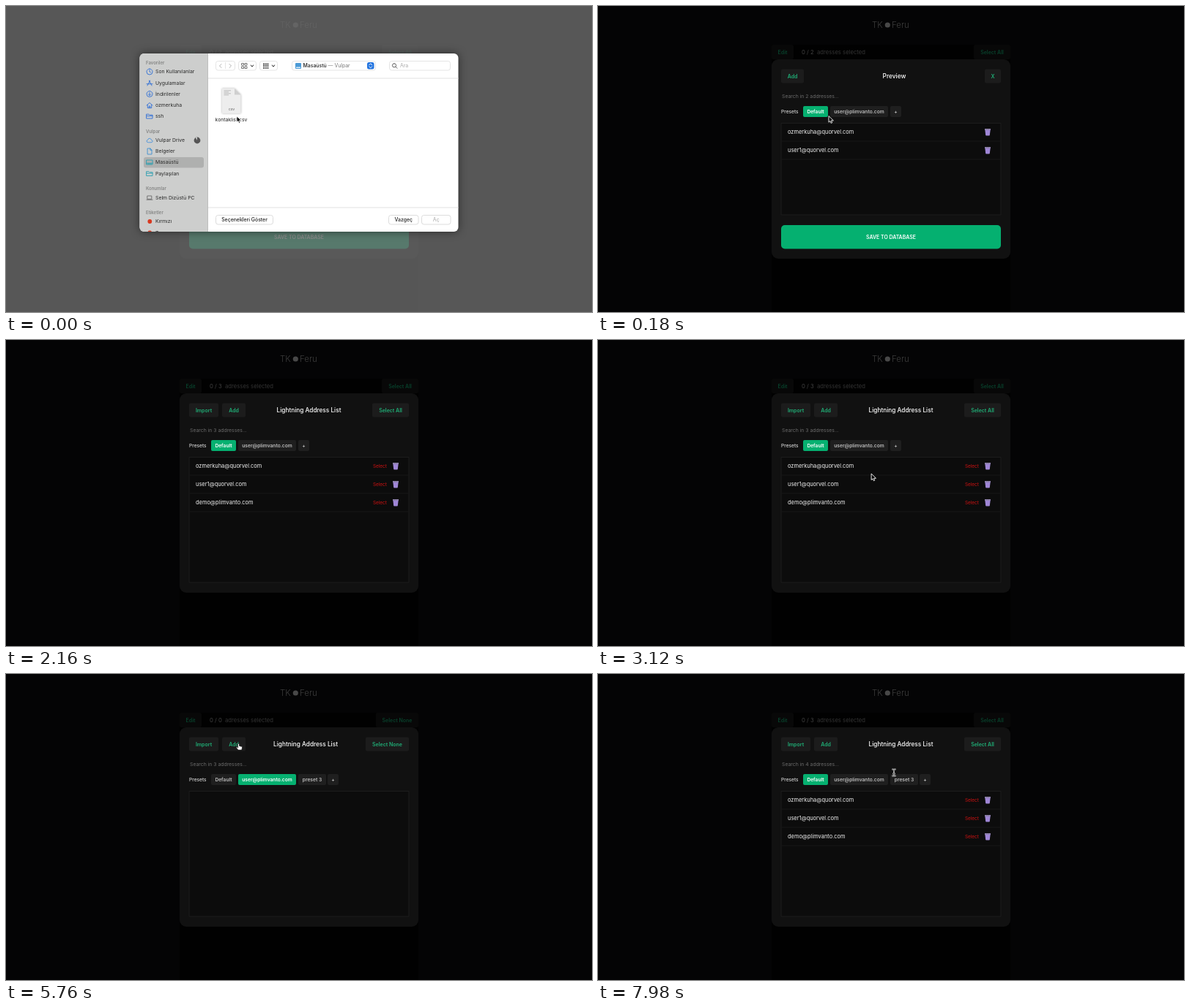
Recreate the animation shown at these times as an HTML page with a canvas. Size 800x419 px, loop 8 s.

```html
<!DOCTYPE html>
<html lang="en">
<head>
<meta charset="utf-8">
<title>Address list</title>
<style>
  html, body { margin: 0; width: 100%; height: 100%; overflow: hidden; background: #040405; }
  canvas { display: block; width: 800px; height: 419px; }
</style>
</head>
<body>
<canvas id="stage"></canvas>
<script>
const LOOP = 8000, STEP = 60;
const FONT = 'Inter, "Open Sans", sans-serif';
const GREEN = '#05b070', BUTTON = '#1c1c1c', LABEL = '#1fae76';
const PRESET = 'user@plimvanto.com', NEW_ADDRESS = 'demo@plimvanto.com';
const SAVED = ['ozmerkuha@quorvel.com', 'user1@quorvel.com', NEW_ADDRESS];

const canvas = document.getElementById('stage');
const ctx = canvas.getContext('2d');
const ratio = window.devicePixelRatio || 1;
canvas.width = 800 * ratio;
canvas.height = 419 * ratio;

// ---------- drawing helpers ----------
function box(x1, y1, x2, y2, fill, radius = 0, stroke) {
  const inset = stroke ? 0.5 : 0;
  ctx.beginPath();
  ctx.roundRect(x1 + inset, y1 + inset, x2 - x1 - 2 * inset, y2 - y1 - 2 * inset, radius);
  if (fill) { ctx.fillStyle = fill; ctx.fill(); }
  if (stroke) { ctx.strokeStyle = stroke; ctx.lineWidth = 1; ctx.stroke(); }
}

// y is the middle of the capital letters
function text(str, x, y, size, color, weight = 400, align = 'left') {
  ctx.font = `${weight} ${size}px ${FONT}`;
  ctx.textAlign = align;
  ctx.fillStyle = color;
  ctx.fillText(str, x, y + size * 0.36);
  return ctx.measureText(str).width;
}

function shape(d, x, y, fill, stroke, width = 0.9) {
  ctx.save();
  ctx.translate(x, y);
  const path = new Path2D(d);
  if (fill) { ctx.fillStyle = fill; ctx.fill(path); }
  if (stroke) {
    ctx.strokeStyle = stroke;
    ctx.lineWidth = width;
    ctx.lineCap = ctx.lineJoin = 'round';
    ctx.stroke(path);
  }
  ctx.restore();
}

function dot(x, y, r, color) {
  ctx.beginPath();
  ctx.arc(x, y, r, 0, 7);
  ctx.fillStyle = color;
  ctx.fill();
}

function button(label, x1, y1, x2, y2, fill = BUTTON, color = LABEL, size = 7, weight = 600) {
  box(x1, y1, x2, y2, fill, 2);
  text(label, (x1 + x2) / 2, (y1 + y2) / 2, size, color, weight, 'center');
}

// ---------- app state by time ----------
const typed = (str, t, start, end) =>
  str.slice(0, Math.max(0, Math.floor((t - start) / (end - start) * str.length + 1e-6)));

function stateAt(t) {
  const preview = t < 780;
  const second = t >= 5280 && t < 7560;
  const added = t >= 6960;
  return {
    preview, second,
    addresses: preview ? SAVED.slice(0, 2) : second ? (added ? [NEW_ADDRESS] : []) : SAVED,
    total: preview ? 2 : added ? 4 : 3,
    presetInput: t >= 3960 && t < 4740,
    presetName: typed('preset 3', t, 4260, 4620),
    thirdPreset: t >= 4740,
    form: t >= 5880 && t < 6960,
    entry: t >= 6780 ? NEW_ADDRESS : typed('demo@plimv', t, 6180, 6560),
    suggest: t >= 6240 && t < 6780
  };
}

// ---------- page and panel ----------
function drawPage(s) {
  const selectLabel = s.addresses.length ? 'Select All' : 'Select None';
  box(0, 0, 800, 419, '#040405');
  box(237, 53, 563, 419, '#010101');
  text('TK', 374, 26, 11.5, '#3d3d3d', 300);
  dot(395.3, 26, 3.6, '#484848');
  text('Feru', 401, 26, 11.5, '#3d3d3d', 300);
  button('Edit', 237, 53, 267, 73, '#080808', '#08402b');
  text(`0 / ${s.addresses.length}`, 278, 63, 7.7, '#434343');
  text('adresses selected', 299, 63, 7.7, '#343434');
  button(selectLabel, s.addresses.length ? 513 : 505, 53, 563, 73, '#080808', '#08402b');
}

function drawTrash(x, y) {
  shape('M-3.6-2.6H3.6L2.8 4.6Q2.6 5 2 5H-2Q-2.6 5-2.8 4.6Z', x, y, '#9f86d6');
  shape('M-4-4.2H4V-2.8H-4Z', x, y, '#c3b0ee');
}

function drawPresets(s, y) {
  const chip = (label, x1, x2, active) => button(label, x1, y - 7.5, x2, y + 7.5,
    active ? GREEN : '#1f1f1f', active ? '#fff' : '#bdbdbd', 6.65);
  text('Presets', 250, y, 6.65, '#f0f0f0');
  chip('Default', 280, 314, !s.second);
  chip(PRESET, 317, 396, s.second);
  if (s.thirdPreset) {
    chip('preset 3', 399, 437);
    chip('+', 439, 454);
    return;
  }
  chip('+', 399, 414);
  if (!s.presetInput) return;
  box(397.5, y - 8.5, 414.5, y + 8.5, null, 3, '#cdd5ff');
  box(398.5, y - 7.5, 413.5, y + 7.5, null, 2, '#4c62c8');
  box(416, y - 7.5, 501, y + 7.5, '#fff', 1);
  if (s.presetName) {
    const width = text(s.presetName, 422, y, 6.8, '#111');
    box(422.5 + width, y - 4, 423.2 + width, y + 4, '#111');
  } else text('Press enter...', 422, y, 6.6, '#858585');
}

function drawForm(s) {
  box(250, 115, 550, 156, '#0c0c0c', 0, '#1d1d1d');
  text('New Address', 259, 136, 7.6, '#f4f4f4', 500);
  const width = text(s.entry, 326, 136, 6.9, '#10b573');
  box(326.5 + width, 132, 327.3 + width, 140, '#10b573');
}

function drawSuggestion() {
  shape('M0 5L5 0L10 5Z', 385, 147, '#fafafa');
  box(379, 151, 483, 175.5, '#fafafa', 2);
  text(NEW_ADDRESS, 385.5, 163.5, 7.1, '#1c1c1c');
}

function drawPanel(s) {
  const y = s.form ? 51 : 0;
  const listBottom = s.preview ? 286.5 : 332.5;
  box(237, 73, 563, 346, '#111', 9);

  if (s.preview) {
    button('Add', 250, 86.5, 281, 105.5);
    button('X', 528, 86.5, 550, 105.5);
    text('Preview', 404.5, 96, 8.4, '#fff', 500, 'center');
  } else {
    const none = !s.addresses.length;
    button('Import', 250, 86.5, 290, 105.5);
    button(s.form ? 'X' : 'Add', 295, 86.5, s.form ? 317.5 : 327, 105.5);
    button(none ? 'Select None' : 'Select All', none ? 491 : 500, 86.5, 550, 105.5);
    text('Lightning Address List', s.form ? 404.5 : none ? 409 : 413.5, 96, 8.25, '#fff', 500, 'center');
  }

  if (s.form) drawForm(s);
  text(`Search in ${s.total} addresses...`, 251, 124 + y, 6.85, '#6b6b6b');
  drawPresets(s, 144.5 + y);

  box(249.5, 160 + y, 550.5, listBottom, '#0c0c0c', 0, '#1d1d1d');
  s.addresses.forEach((address, i) => {
    const rowY = 172.5 + y + i * 25;
    text(address, 259, rowY, 7.45, '#f2f2f2');
    if (!s.preview) text('Select', 501, rowY + 0.5, 6.4, '#d01212');
    drawTrash(532, rowY);
    box(250, rowY + 12, 550, rowY + 13, '#161616');
  });

  if (s.preview) {
    box(250, 300, 550, 332.5, GREEN, 5);
    text('SAVE TO DATABASE', 400, 316, 6.95, '#fff', 600, 'center');
  }
  if (s.suggest) drawSuggestion();
}

// ---------- file dialog ----------
const ICONS = {
  clock: 'M4 0A4 4 0 1 1 4 8A4 4 0 1 1 4 0M4 1.8V4L5.5 5',
  apps: 'M1 7.5L4.6 .6M3.4 .6L7 7.5M0 5.2H8',
  down: 'M4 0A4 4 0 1 1 4 8A4 4 0 1 1 4 0M4 2V6M2.4 4.4L4 6L5.6 4.4',
  home: 'M0 4L4 .5L8 4M1.3 3.5V7.6H6.7V3.5M3.2 7.6V5H4.8V7.6',
  folder: 'M0 1.2H3L4 2.2H8V7H0ZM0 3.6H8',
  cloud: 'M2 6.8Q0 6.8 0 5Q0 3.5 1.6 3.4Q2 1 4.4 1.3Q6.2 1.6 6.4 3.6Q8.2 3.8 8.2 5.2Q8 6.8 6.4 6.8Z',
  page: 'M1.5 0H5L7 2V8H1.5ZM4.8 0V2.3H7',
  desktop: 'M0 1H8V7H0ZM0 5.2H8M1.6 6.1H6.4',
  laptop: 'M1.2 1.5H6.8V5.8H1.2ZM0 6.8H8'
};
const BLUE = '#2f6fd6', TEAL = '#2d9fb0', GREY = '#6b6b6b';
const SIDEBAR = [
  ['Favoriler', 78],
  ['Son Kullanılanlar', 90, 'clock', BLUE], ['Uygulamalar', 105.5, 'apps', BLUE],
  ['İndirilenler', 120.5, 'down', BLUE], ['ozmerkuha', 136, 'home', BLUE], ['ssh', 151, 'folder', BLUE],
  ['Vulpar', 171.5],
  ['Vulpar Drive', 184, 'cloud', '#4a94dc'], ['Belgeler', 199, 'page', '#3f8fd0'],
  ['Masaüstü', 214, 'desktop', TEAL], ['Paylaşılan', 229.5, 'folder', TEAL],
  ['Konumlar', 250],
  ['Selm Dizüstü PC', 262.5, 'laptop', GREY],
  ['Etiketler', 282.5],
  ['Kırmızı', 295, null, '#d8391f'], ['Turuncu', 310.5, null, '#d8391f']
];

function drawSidebar() {
  box(182, 65, 276, 309, '#cdcecd');
  box(275, 65, 276, 309, '#bdbebd');
  box(188, 207, 270, 221.5, '#afb0af', 3);
  for (const [label, y, icon, color] of SIDEBAR) {
    if (!color) { text(label, 191, y, 6, '#858685', 600); continue; }
    if (icon) shape(ICONS[icon], 192, y - 4, null, color);
    else dot(196.3, y, 2.9, color);
    text(label, 204, y, 6.85, '#2a2a2a');
  }
  dot(261, 184, 4.4, '#555');
  shape('M0 0V-4.4A4.4 4.4 0 0 0-2.2-3.8Z', 261, 184, '#cdcecd');
}

function drawToolbar() {
  const frame = (x1, x2) => box(x1, 75, x2, 88.5, '#fff', 3, '#e4e4e4');
  frame(286, 313); frame(317, 342); frame(346, 371); frame(390, 505); frame(523, 607);
  box(299, 77, 300, 86, '#e4e4e4');
  shape('M2-2.5L-.5 0L2 2.5', 292, 82, null, '#a8a8a8');
  shape('M-2-2.5L.5 0L-2 2.5', 307, 82, null, '#a8a8a8');
  shape('M0 0H2.6V2.6H0ZM4.4 0H7V2.6H4.4ZM0 4.4H2.6V7H0ZM4.4 4.4H7V7H4.4Z', 322, 78.5, null, '#555', 0.8);
  for (let i = 0; i < 9; i++) {
    const x = 351 + i % 3 * 2.7, y = 78.5 + Math.floor(i / 3) * 2.7;
    box(x, y, x + 2.1, y + 1.9, '#555');
  }
  for (const x of [336, 365]) shape('M-1.8-1L0 1L1.8-1', x, 82, null, '#444', 1.1);
  box(395, 78, 403, 86, '#4b9ad6', 1);
  box(396, 83.5, 402, 85, '#dcecf8');
  const width = text('Masaüstü', 405.5, 82, 6.9, '#222', 500);
  text(' — Vulpar', 405.5 + width, 82, 6.9, '#777');
  box(493, 77, 502.5, 86.5, '#2475e0', 2.5);
  shape('M-2-1L0-3L2-1M-2 1L0 3L2 1', 497.7, 81.8, null, '#fff', 1);
  shape('M0-2.6A2.6 2.6 0 1 1 0 2.6A2.6 2.6 0 1 1 0-2.6M2 2L4 4', 530, 81.3, null, '#555');
  text('Ara', 538, 82, 6.9, '#a9a9a9');
}

function drawFile() {
  ctx.save();
  ctx.shadowColor = '#0005';
  ctx.shadowBlur = 3 * ratio;
  shape('M0 0H17L25.5 8.5V34H0Z', 295, 113, '#ededed');
  ctx.restore();
  shape('M17 0V8.5H25.5Z', 295, 113, '#cfcfcf');
  for (let i = 0; i < 4; i++) box(297.5, 115.5 + i * 2, 307 - i % 2 * 3, 116.3 + i * 2, '#aaa');
  text('CSV', 308, 141.5, 4, '#777', 600, 'center');
  text('kontaklist.csv', 307.5, 155.5, 6.8, '#222', 400, 'center');
}

function drawDialog(alpha) {
  ctx.globalAlpha = alpha;
  box(0, 0, 800, 419, 'rgba(108,108,108,.8)');
  ctx.save();
  ctx.shadowColor = '#0008';
  ctx.shadowBlur = 12 * ratio;
  box(182.5, 65, 617.5, 309, '#fff', 6);
  ctx.restore();
  ctx.save();
  ctx.beginPath();
  ctx.roundRect(182.5, 65, 435, 244, 6);
  ctx.clip();
  drawSidebar();
  drawToolbar();
  box(276, 98.5, 618, 99.5, '#e2e2e2');
  box(276, 275.5, 618, 276.5, '#e2e2e2');
  drawFile();
  const plain = (label, x1, x2, color) => {
    box(x1, 286, x2, 299.5, '#fff', 3, '#dcdcdc');
    text(label, (x1 + x2) / 2, 292.7, 6.9, color, 500, 'center');
  };
  plain('Seçenekleri Göster', 286, 365, '#222');
  plain('Vazgeç', 522, 563.5, '#222');
  plain('Aç', 567, 607.5, '#b5b5b5');
  ctx.restore();
  ctx.globalAlpha = 1;
}

// ---------- pointer ----------
const POINTERS = {
  arrow(x, y) {
    shape('M0 0V8.2L1.9 6.5L3.2 9.4L4.7 8.7L3.4 5.9H6Z', x, y, '#000', '#fff', 0.9);
  },
  hand(x, y) {
    shape('M-1 .4Q0-.8 1 .4V3L4.2 3.8Q5.2 4.2 5 5.4L4.3 8.6H-.6L-3 5.4Q-3.2 4.2-2 4.4L-1 5.2Z', x, y, '#fff', '#111', 0.7);
  },
  beam(x, y) {
    const path = 'M-1.8-4.5Q0-4.5 0-3.3V3.3Q0 4.5-1.8 4.5M1.8-4.5Q0-4.5 0-3.3M0 3.3Q0 4.5 1.8 4.5M-1 1.5H1';
    shape(path, x, y, null, '#e8e8e8', 1.8);
    shape(path, x, y, null, '#333', 0.7);
  }
};
// time, x, y, look from this time on (null hides it)
const TRACK = [
  [0, 315, 151, 'arrow'], [300, 315, 151, 'arrow'], [600, 400, 314, 'hand'], [720, 400, 314, 'hand'],
  [840, 402, 262, 'arrow'], [1440, 455, 64, 'arrow'], [1680, 455, 64, null],
  [2700, 330, 232, 'arrow'], [3300, 385, 170, 'arrow'], [3660, 406, 146, 'hand'], [3960, 406, 146, 'hand'],
  [4140, 434, 141, 'beam'], [4260, 434, 141, null],
  [4860, 434, 141, 'arrow'], [5160, 352, 146, 'hand'], [5340, 352, 146, 'hand'],
  [5640, 317.5, 95.5, 'hand'], [5880, 317.5, 95.5, 'arrow'], [6060, 345, 136, 'beam'], [6180, 345, 136, null],
  [7080, 345, 136, 'arrow'], [7440, 298, 146, 'hand'], [7620, 298, 146, 'hand'],
  [7860, 402, 136, 'beam'], [7980, 404, 135, 'beam']
];

function drawPointer(t) {
  const i = TRACK.findLastIndex(key => key[0] <= t);
  const [start, x, y, look] = TRACK[i];
  if (!look) return;
  const [end, nextX, nextY] = TRACK[i + 1] || [start + 1, x, y];
  const k = Math.min(1, (t - start) / (end - start));
  const ease = k * k * (3 - 2 * k);
  POINTERS[look](x + (nextX - x) * ease, y + (nextY - y) * ease);
}

function frame(now) {
  const t = Math.floor(now % LOOP / STEP) * STEP;
  const state = stateAt(t);
  ctx.setTransform(ratio, 0, 0, ratio, 0, 0);
  drawPage(state);
  drawPanel(state);
  if (t < 180) drawDialog([1, 0.55, 0.15][t / STEP]);
  drawPointer(t);
  requestAnimationFrame(frame);
}
requestAnimationFrame(frame);
</script>
</body>
</html>
```
